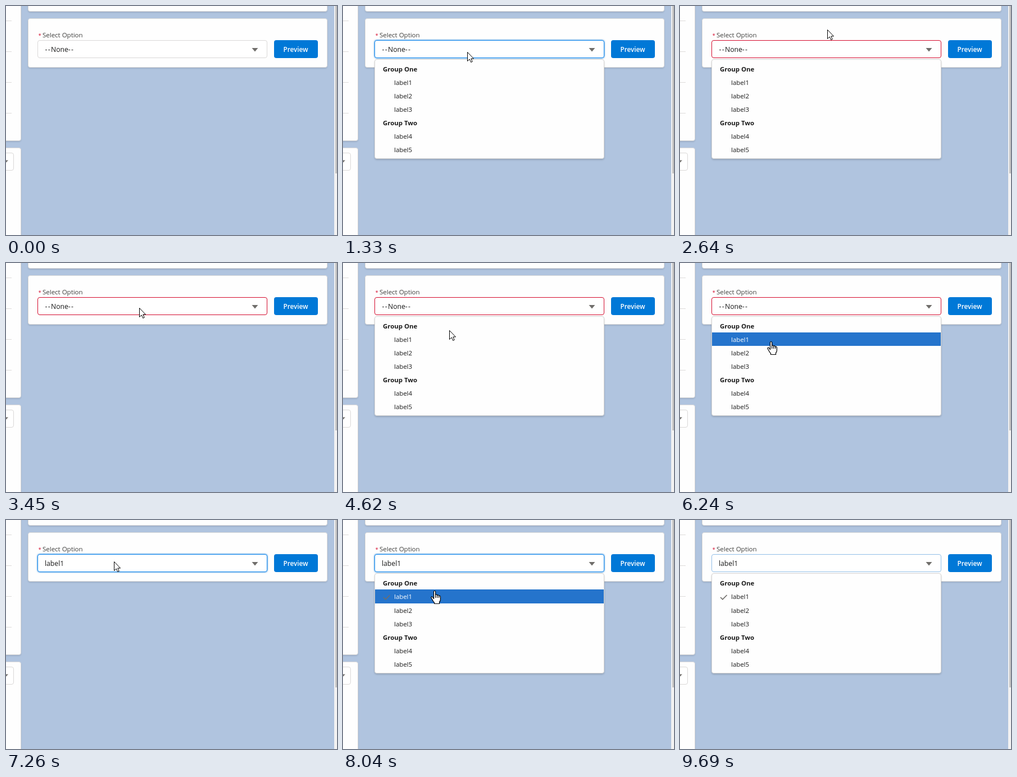
These frames come from a looping animation (589 by 409 pixels, 9.79 s). An HTML page:

```html
<!DOCTYPE html>
<html lang="en">
<head>
<meta charset="utf-8">
<title>Grouped combobox</title>
<style>
  html, body { margin: 0; width: 100%; height: 100%; overflow: hidden; background: #b0c4df; }
  svg { display: block; }
  text { font: 11.4px "Open Sans", sans-serif; fill: #181818; white-space: pre; }
  .card { fill: #fefefe; stroke: #dddbda; filter: drop-shadow(0 2px 1px #0000001a); }
  .list { fill: #fefefe; stroke: #d4d3d2; filter: drop-shadow(0 2px 1.5px #00000029); }
  .rule { stroke: #dddbda; }
  .field { fill: #fff; stroke: #dad8d7; }
  .focus { stroke: #1589ee; filter: drop-shadow(0 0 1.5px #0070d2); }
  .fading { stroke: #92bfe8; }
  .error { stroke: #d4092b; }
  .value { font-size: 12.2px; }
  .bold { font-weight: 700; }
  .pointer { fill: #fff; stroke: #000; stroke-linejoin: round; }
</style>
</head>
<body>
<svg width="589" height="409">
  <rect class="card" x="39.5" y="-20.5" width="532" height="30" rx="3.5"/>
  <rect class="card" x="39.5" y="22.5" width="532" height="87" rx="3.5"/>
  <rect class="card" x="-20.5" y="-20.5" width="47" height="261" rx="3.5"/>
  <rect class="card" x="-20.5" y="253.5" width="47" height="200" rx="3.5"/>
  <path class="rule" d="M0 26.5h10M0 81.5h10M0 136.5h10M0 191.5h10"/>
  <rect class="field" x="-20.5" y="262.5" width="34" height="31" rx="3.5"/>
  <path d="M-7 275.5H4L-1.5 281.5z" fill="#706e6b"/>
  <rect x="584" width="5" height="409" fill="#f3f2f2"/>
  <rect x="586" width="3" height="299" fill="#c1c1c1"/>

  <text x="57.5" y="55.5" style="font-size:9.5px;fill:#d4092b">*</text>
  <text x="65" y="56" style="font-size:11.5px;fill:#3e3e3c">Select Option</text>
  <rect id="field" x="56.5" y="61.5" width="408" height="31" rx="3.5"/>
  <text id="none" class="value" x="69.5" y="82"><tspan letter-spacing="1.3">--</tspan>None<tspan letter-spacing="1.3">--</tspan></text>
  <text id="chosen" class="value" x="69" y="82">label1</text>
  <path d="M437.5 75H448.5L443 81.5z" fill="#706e6b"/>
  <rect x="477" y="61" width="78" height="32" rx="4" fill="#0078d7"/>
  <text x="493.5" y="82" style="font-size:11.7px;font-weight:600;fill:#fff">Preview</text>

  <g id="menu">
    <rect id="panel" class="list" x="56.5" y="95.5" width="408" rx="3.5"/>
    <rect id="hover" x="57" width="407" fill="#2574cc"/>
    <g id="rows"></g>
    <path id="check" d="M72 138l3.8 3.8L83.5 134" fill="none" stroke="#706e6b" stroke-width="1.7"/>
  </g>
  <path id="arrow" class="pointer" d="M.5.5V16.5L4.2 13 6.7 18.5 9.2 17.4 6.8 12H11.5z"/>
  <path id="hand" class="pointer" stroke-width="1.2" d="M-1.5 15V2Q-1.4.5 0 .5 1.5.5 1.6 2V8Q2 6.8 3.2 7 4.6 7.2 4.6 9 5.2 7.7 6.3 8 7.6 8.3 7.6 10 8.3 9 9.3 9.4 10.4 9.8 10.4 11.4V16Q10.4 18.5 8.5 20.5V23.5H-.5V21.5Q-3 19-4.2 16L-6 13Q-6.4 11.5-5 11.2-4 11-3 12.5L-1.5 14.6M1.6 8V13M4.6 9V13M7.6 10V13"/>
</svg>
<script>
const LOOP = 9790;
const STEP = 120; // the pointer advances in visible ticks
const ROWS = ["Group One", "label1", "label2", "label3", "Group Two", "label4", "label5"];
const OPENED = 1330, BLURRED = 2520, CLOSED = 2790, REOPENED = 4250;
const CHOSEN = 6490, LAST_OPENED = 7510, GONE = 8830, LAST_BLURRED = 9690;

// Pointer strokes: when each starts, its number of ticks and where it ends
const STROKES = [
  { start: 250, ticks: 1, to: [266, 252] },
  { start: 400, ticks: 2, to: [232, 40] },
  { start: 670, ticks: 2, to: [221, 82] },
  { start: 2400, ticks: 3, to: [262, 42] },
  { start: 3180, ticks: 3, to: [237, 80] },
  { start: 4500, ticks: 2, to: [189, 120] },
  { start: 4770, ticks: 5, to: [162, 206] },
  { start: 5370, ticks: 2, to: [162, 237] },
  { start: 5640, ticks: 6, to: [162, 140] },
  { start: 7020, ticks: 3, to: [192, 74] },
  { start: 7920, ticks: 2, to: [163, 126] },
  { start: 8200, ticks: 1, to: [164, 121] },
  { start: 8320, ticks: 2, to: [163, 141] },
  { start: 8590, ticks: 2, to: [180, 322] }
];

const $ = id => document.getElementById(id);
const show = (id, on) => { $(id).style.display = on ? "" : "none"; };
const isOption = i => ROWS[i].startsWith("label");

const labels = ROWS.map((name, i) => {
  const text = document.createElementNS("http://www.w3.org/2000/svg", "text");
  text.textContent = name;
  text.setAttribute("x", isOption(i) ? 91 : 71);
  if (!isOption(i)) text.setAttribute("class", "bold");
  $("rows").append(text);
  return text;
});

function pointerAt(t) {
  const i = STROKES.findLastIndex(stroke => stroke.start <= t);
  if (i < 0 || t >= GONE) return null;
  const { start, ticks, to } = STROKES[i];
  const from = i ? STROKES[i - 1].to : to;
  const done = Math.min(1, (Math.floor((t - start) / STEP) + 1) / ticks);
  return to.map((end, axis) => Math.round(from[axis] + (end - from[axis]) * done));
}

function fieldState(t) {
  if (t >= LAST_BLURRED) return "fading";
  if (t >= CHOSEN) return "focus";
  if (t >= BLURRED + STEP) return "error";
  if (t >= BLURRED) return "fading";
  return t >= OPENED - 150 ? "focus" : "";
}

function draw(t) {
  const chosen = t >= CHOSEN;
  const open = t >= OPENED && t < CLOSED || t >= REOPENED && t < CHOSEN || t >= LAST_OPENED;
  const extra = chosen ? 1 : 0; // the checked row is one pixel taller
  const top = i => 100 + 24 * i + (i > 1 ? extra : 0);
  const pointer = pointerAt(t);
  const hovered = open && pointer
    ? ROWS.findIndex((_, i) => isOption(i) && pointer[1] >= top(i) && pointer[1] < top(i + 1))
    : -1;
  const hovering = hovered >= 0;

  $("field").setAttribute("class", "field " + fieldState(t));
  show("none", !chosen);
  show("chosen", chosen);
  show("check", chosen);
  show("menu", open);
  $("panel").setAttribute("height", 177 + extra);
  labels.forEach((text, i) => {
    text.setAttribute("y", top(i) + 17);
    text.style.fill = i === hovered ? "#fff" : "";
  });
  show("hover", hovering);
  if (hovering) {
    $("hover").setAttribute("y", top(hovered));
    $("hover").setAttribute("height", top(hovered + 1) - top(hovered));
  }

  show("hand", hovering);
  show("arrow", pointer && !hovering);
  if (pointer) $(hovering ? "hand" : "arrow").setAttribute("transform", `translate(${pointer})`);
}

function tick() {
  draw(performance.now() % LOOP);
  requestAnimationFrame(tick);
}
tick();
</script>
</body>
</html>
```
